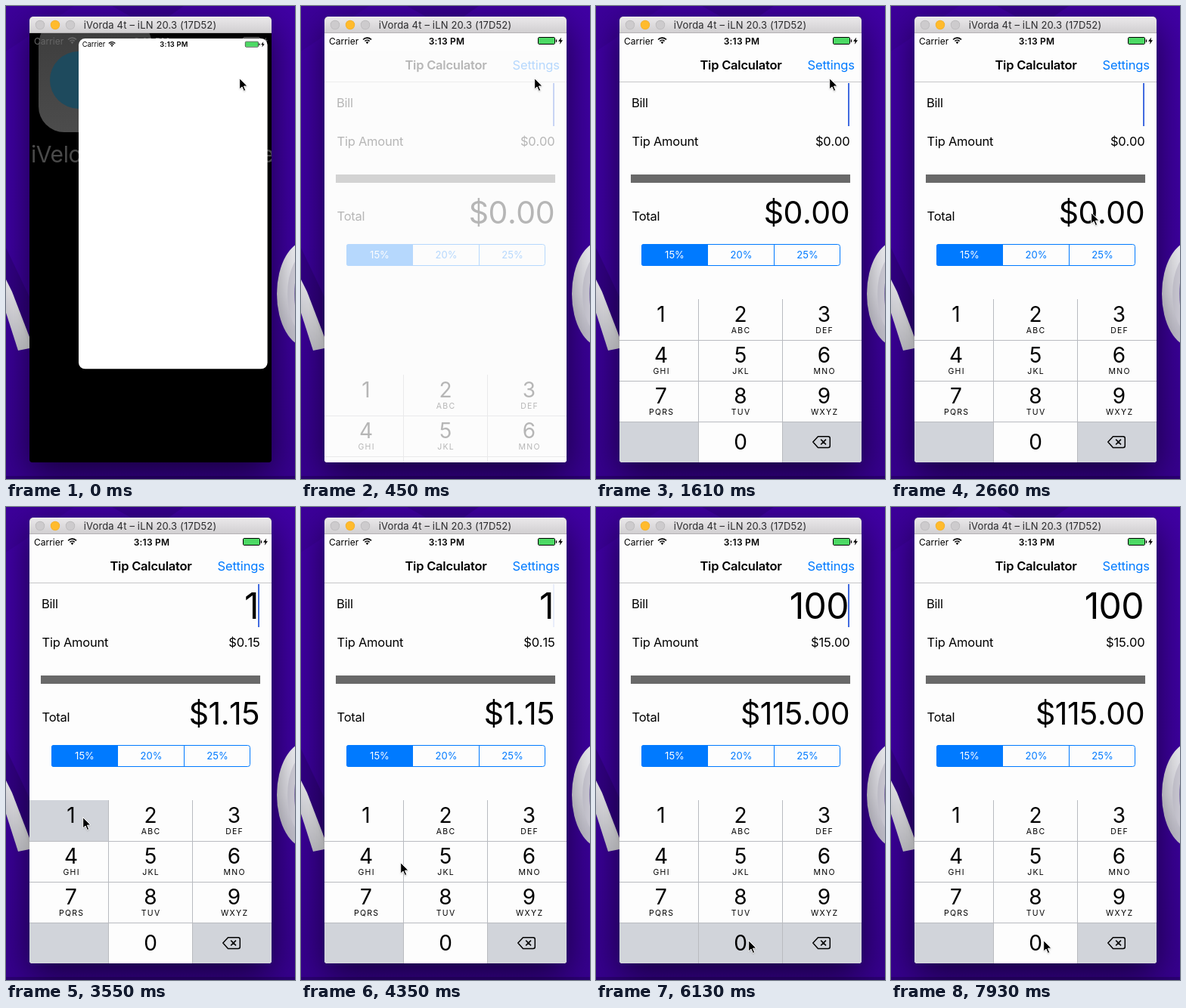
These frames come from a looping animation (382x626 px, 8000 ms). An HTML page with a canvas:

```html
<!DOCTYPE html>
<html lang="en">
<head>
<meta charset="utf-8">
<title>Tip Calculator</title>
<style>
  html, body { margin: 0; width: 100%; height: 100%; overflow: hidden; background: #3a0098; }
  canvas { display: block; width: 382px; height: 626px; }
</style>
</head>
<body>
<canvas id="stage"></canvas>
<script>
const W = 382, H = 626, LOOP = 8000;
const BLUE = '#007aff', KEY_GRAY = '#d1d4da', PAPER = '#fdfdfd';
const SCREEN = { x: 31, y: 36, w: 320, h: 568 };

const canvas = document.getElementById('stage');
const dpr = window.devicePixelRatio || 1;
canvas.width = W * dpr;
canvas.height = H * dpr;
const ctx = canvas.getContext('2d');

const KEYS = [['1', ''], ['2', 'ABC'], ['3', 'DEF'], ['4', 'GHI'], ['5', 'JKL'], ['6', 'MNO'],
  ['7', 'PQRS'], ['8', 'TUV'], ['9', 'WXYZ'], ['', ''], ['0', ''], ['', '']];
const COLS = [31, 136, 247, 351];
const KEY_MID = [86, 191, 301.5];

// Key presses: down, up, index of the key, bill afterwards
const PRESSES = [
  { down: 3550, up: 3720, key: 0, bill: '1' },
  { down: 5410, up: 5590, key: 10, bill: '10' },
  { down: 6130, up: 6220, key: 10, bill: '100' }
];

// Caret blinking: valid from, first fade-out, period, delay until fade-in
const BLINKS = [
  { from: 0, out: 1000, period: 970, back: 520 },
  { from: 3550, out: 4240, period: 990, back: 450 },
  { from: 5410, out: 6760, period: 990, back: 450 }
];

// Pointer moves along cubic curves
const MOVES = [
  { at: 1970, steps: 10, ease: p => p ** 1.4, path: [[308, 95], [358, 110], [320, 260], [163, 363]] },
  { at: 2840, steps: 4, ease: p => 1 - (1 - p) ** 1.6, path: [[163, 363], [142, 380], [120, 397], [101, 410]] },
  { at: 4080, steps: 10, ease: p => p * p * (3 - 2 * p), path: [[101, 410], [125, 465], [165, 530], [201, 573]] }
];

function rect(x, y, w, h, fill) {
  ctx.fillStyle = fill;
  ctx.fillRect(x, y, w, h);
}

function round(x, y, w, h, r) {
  ctx.beginPath();
  ctx.roundRect(x, y, w, h, r);
}

function poly(points, fill) {
  ctx.beginPath();
  points.forEach(([x, y]) => ctx.lineTo(x, y));
  ctx.closePath();
  ctx.fillStyle = fill;
  ctx.fill();
}

function oval(x, y, rx, ry, fill) {
  ctx.beginPath();
  ctx.ellipse(x, y, rx, ry, 0, 0, Math.PI * 2);
  ctx.fillStyle = fill;
  ctx.fill();
}

function fade(x0, y0, x1, y1, ...colors) {
  const g = ctx.createLinearGradient(x0, y0, x1, y1);
  colors.forEach((c, i) => g.addColorStop(i / (colors.length - 1), c));
  return g;
}

function text(s, x, y, size, { color = '#000', align = 'left', weight = 400, track = -0.014, kern = 'auto' } = {}) {
  ctx.font = `${weight} ${size}px Inter, "Liberation Sans", sans-serif`;
  ctx.letterSpacing = `${track * size}px`;
  ctx.fontKerning = kern;
  ctx.textAlign = align;
  ctx.fillStyle = color;
  ctx.fillText(s, x, y);
}

function figure(s, x, y, size) {
  text(s, x, y, size, { align: 'right', track: -0.012, kern: 'none' });
}

function backdrop() {
  rect(0, 0, W, H, fade(0, 0, 0, H, '#4000a4', '#3d00a0', '#36008e'));
  poly([[0, 0], [90, 0], [0, 60]], 'rgba(20,0,70,.1)');
  poly([[140, 0], [235, 0], [215, 14], [165, 14]], 'rgba(20,0,70,.2)');
  poly([[0, 320], [31, 385], [31, 440], [0, 362]], 'rgba(20,0,60,.25)');

  poly([[0, 362], [8, 378], [31, 438], [31, 453], [16, 456], [0, 406]],
    fade(0, 410, 31, 400, '#cfced6', '#eeeef2', '#d0cfd7'));

  oval(399, 381, 41, 71, fade(358, 330, 382, 430, '#f1f1f5', '#e3e2ea', '#c4c2ce'));
  oval(399, 381, 27, 55, '#d3d1dc');
  oval(399, 381, 18, 45, '#8a7ab4');

  rect(0, 622, W, 4, 'rgba(15,0,50,.3)');
}

function windowFrame() {
  ctx.save();
  ctx.shadowColor = 'rgba(0,0,0,.6)';
  ctx.shadowBlur = 48 * dpr;
  ctx.shadowOffsetY = 14 * dpr;
  round(31, 14, 320, 590, 5);
  ctx.fillStyle = '#000';
  ctx.fill();
  ctx.restore();

  round(31, 14, 320, 22, [5, 5, 0, 0]);
  ctx.fillStyle = fade(0, 14, 0, 36, '#ebe9eb', '#d0ced0');
  ctx.fill();
  rect(31, 35, 320, 1, '#b4b2b4');
  [[45, '#cdcbcd', '#b8b6b8'], [65, '#ffbb2d', '#f0ad2a'], [85, '#cdcbcd', '#b8b6b8']].forEach(([x, fill, edge]) => {
    oval(x, 25, 6.2, 6.2, edge);
    oval(x, 25, 5.5, 5.5, fill);
  });
  text('iVorda 4t – iLN 20.3 (17D52)', 190.5, 30, 13, { color: '#2a2a2c', align: 'center', track: 0.012 });
}

function statusBar(ink, charge) {
  text('Carrier', 37, 50.5, 12, { color: ink, track: 0 });
  text('3:13 PM', 192.5, 50.5, 12, { color: ink, weight: 600, align: 'center', track: 0.02 });

  ctx.strokeStyle = ink;
  ctx.lineWidth = 1.6;
  [4.3, 7.4].forEach(r => {
    ctx.beginPath();
    ctx.arc(87.5, 49.5, r, -Math.PI * 0.76, -Math.PI * 0.24);
    ctx.stroke();
  });
  poly([[87.5, 50.2], [85.6, 47.8], [87.5, 46.9], [89.4, 47.8]], ink);

  ctx.lineWidth = 1;
  round(313.5, 41.5, 22, 9, 1.5);
  ctx.stroke();
  rect(314, 42, 21, 8, charge);
  rect(336.8, 44.4, 1.4, 3.4, ink);
  poly([[344.2, 41.5], [340, 46.8], [342.6, 46.8], [341.8, 50.8], [346, 45.3], [343.4, 45.3]], ink);
}

function homeScreen(r) {
  ctx.save();
  ctx.globalAlpha = r;
  round(43, 17, 150, 150, 34);
  ctx.fillStyle = fade(0, 36, 0, 167, '#3e3e3e', '#4c4c4c');
  ctx.fill();
  oval(96, 98, 38, 38, '#1e4a5d');
  text('iVelo', 33, 207, 30, { color: '#4a4a4a' });
  text('e', 337, 207, 30, { color: '#4a4a4a' });
  statusBar('#666', '#333');
  ctx.restore();
}

function segmentControl() {
  ctx.save();
  round(60, 315, 263, 29, 3);
  ctx.clip();
  rect(60, 315, 88, 29, BLUE);
  rect(235, 315, 1, 29, BLUE);
  ctx.restore();

  ctx.strokeStyle = BLUE;
  ctx.lineWidth = 1;
  round(60.5, 315.5, 262, 28, 3);
  ctx.stroke();
  [['15%', 104, '#fff'], ['20%', 192, BLUE], ['25%', 279.5, BLUE]].forEach(([s, x, color]) =>
    text(s, x, 334, 13, { color, align: 'center', track: 0 }));
}

function keypad(pressed) {
  rect(31, 388, 320, 216, PAPER);
  KEYS.forEach(([digit, letters], i) => {
    const col = i % 3, top = 388 + 54 * Math.floor(i / 3), mid = KEY_MID[col];
    if (!digit || i === pressed) rect(COLS[col], top, COLS[col + 1] - COLS[col], 54, KEY_GRAY);
    text(digit, mid, top + (digit === '0' ? 37 : 30), 28, { align: 'center', track: 0 });
    text(letters, mid + 0.6, top + 45, 10.5, { align: 'center', track: 0.12 });
  });
  [442, 496, 550].forEach(y => rect(31, y, 320, 1, '#b9bbc0'));
  [135, 246].forEach(x => rect(x, 388, 1, 216, '#b9bbc0'));

  ctx.strokeStyle = '#000';
  ctx.lineWidth = 1.5;
  ctx.lineJoin = 'round';
  ctx.beginPath();
  ctx.moveTo(286.8, 577);
  ctx.lineTo(293.5, 569.8);
  ctx.arcTo(309.3, 569.8, 309.3, 577, 2.5);
  ctx.arcTo(309.3, 584.4, 293.5, 584.4, 2.5);
  ctx.lineTo(293.5, 584.4);
  ctx.closePath();
  ctx.moveTo(297.2, 573.6);
  ctx.lineTo(304, 580.4);
  ctx.moveTo(304, 573.6);
  ctx.lineTo(297.2, 580.4);
  ctx.stroke();
}

function caretAlpha(t) {
  const b = BLINKS.filter(b => t >= b.from).pop();
  if (t < b.out) return 1;
  const u = (t - b.out) % b.period;
  if (u < 90) return 0.5;
  if (u < 180) return 0.1;
  if (u < b.back) return 0;
  return u < b.back + 90 ? 0.5 : 1;
}

function calculator(t) {
  const step = Math.floor((t - 450) / 90);
  const last = PRESSES.filter(p => t >= p.down).pop();
  const bill = last ? last.bill : '';
  const money = n => '$' + n.toFixed(2);

  ctx.save();
  text('Tip Calculator', 191.5, 84, 16.5, { weight: 600, align: 'center' });
  text('Settings', 279.5, 84, 16.5, { color: BLUE, track: -0.01 });
  rect(31, 100, 320, 1, '#c6c6c8');

  text('Bill', 47, 133.5, 16.5);
  figure(bill, 334, 148, 48);
  text('Tip Amount', 47.5, 184.5, 16.5);
  figure(money(bill * 0.15), 335.5, 184.5, 16.5);
  rect(46, 223, 290, 11, '#696969');
  text('Total', 47.5, 283.5, 16.5);
  figure(money(bill * 1.15), 335, 288, 41);
  segmentControl();

  ctx.save();
  ctx.globalAlpha = caretAlpha(t);
  rect(333, 102, 2, 57, '#426be0');
  ctx.restore();

  ctx.translate(0, Math.round(100 * 0.48 ** step));
  keypad(last && t < last.up ? last.key : -1);
  ctx.restore();

  // The blank launch image dissolves on top
  ctx.save();
  ctx.globalAlpha = Math.max(0, 0.72 - 0.26 * step);
  rect(31, 60, 320, 544, PAPER);
  ctx.restore();
}

function screen(t) {
  const { x, y, w, h } = SCREEN;
  const shrink = [1, 0.45, 0.13][Math.floor(t / 90)] || 0;
  ctx.save();
  round(x, y, w, h, [0, 0, 4, 4]);
  ctx.clip();
  rect(x, y, w, h, '#000');
  if (shrink) homeScreen(shrink);

  ctx.translate(x + 65 * shrink, y + 7 * shrink);
  ctx.scale(1 - 0.22 * shrink, 1 - 0.23 * shrink);
  ctx.translate(-x, -y);
  round(x, y, w, h, 11 * shrink);
  ctx.fillStyle = shrink ? '#fff' : PAPER;
  ctx.fill();
  statusBar('#000', '#4cd964');
  if (t >= 450) calculator(t);
  ctx.restore();
}

function pointerAt(t) {
  const m = MOVES.filter(m => t >= m.at).pop();
  if (!m) return MOVES[0].path[0];
  const p = m.ease(Math.min(1, (Math.floor((t - m.at) / 87) + 1) / m.steps));
  const q = 1 - p, k = [q ** 3, 3 * q * q * p, 3 * q * p * p, p ** 3];
  return [0, 1].map(axis => m.path.reduce((sum, pt, i) => sum + k[i] * pt[axis], 0));
}

function pointer(t) {
  const [x, y] = pointerAt(t);
  ctx.save();
  ctx.translate(Math.round(x) + 0.7, Math.round(y) + 0.7);
  ctx.shadowColor = 'rgba(0,0,0,.3)';
  ctx.shadowBlur = 2 * dpr;
  ctx.shadowOffsetY = dpr;
  poly([[0, 0], [0, 14.4], [3.3, 11.3], [5.7, 16.8], [8, 15.8], [5.7, 10.5], [10.2, 10.2]], '#000');
  ctx.shadowColor = 'transparent';
  ctx.strokeStyle = '#fff';
  ctx.lineWidth = 1;
  ctx.stroke();
  ctx.restore();
}

function draw(t) {
  ctx.setTransform(dpr, 0, 0, dpr, 0, 0);
  backdrop();
  windowFrame();
  screen(t);
  pointer(t);
}

let start;
function tick(now) {
  start ??= now;
  draw((now - start) % LOOP);
  requestAnimationFrame(tick);
}
draw(0);
requestAnimationFrame(tick);
</script>
</body>
</html>
```
